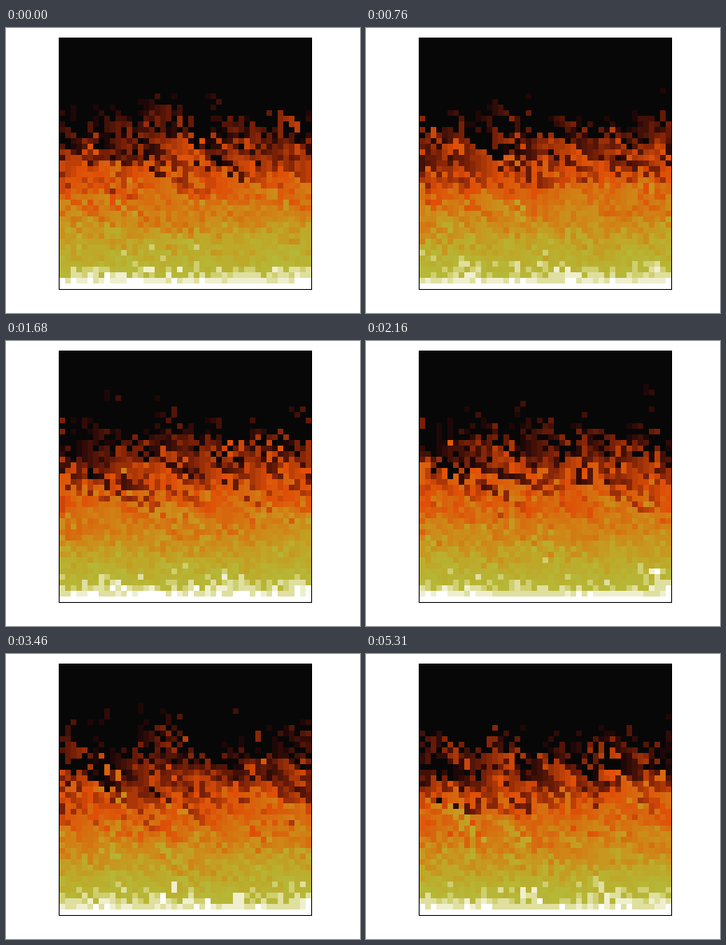
Write a matplotlib script that moves like this. It is 443 px wide and 357 px high and loops after 5720 ms.

```python
import numpy as np
import matplotlib.pyplot as plt
from matplotlib.animation import FuncAnimation
from matplotlib.colors import LinearSegmentedColormap

W, H, DPI = 443, 357, 128
CELL, GRID = 7, 45
SIZE = CELL * GRID
LEFT, TOP = 67, 12
LOOP, TICK = 5720, 10      # ms
STEP = 77                  # ms per fire update
WARMUP = 160
HOTTEST = 36

# Key colours by heat, blended in between
STOPS = {0: "#070707", 1: "#1f0707", 6: "#771f07", 12: "#df4f07",
         21: "#cf8717", 27: "#bfa727", 32: "#b7b737", 33: "#cfcf6f",
         HOTTEST: "#ffffff"}
RAMP = LinearSegmentedColormap.from_list(
    "fire", [(heat / HOTTEST, color) for heat, color in STOPS.items()], N=HOTTEST + 1)
COLORS = RAMP(np.arange(HOTTEST + 1), bytes=True)[:, :3]

# The fire redraws in short bursts, then stalls on single redraws
BURSTS = [(70, 210), (380, 530), (680, 990), (1140, 1460), (1600, 1920),
          (2080, 2480), (2850, 2920)]
SINGLES = [0, 2640, 3150, 3310, 3460, 5100, 5310]


def burst_times(first, last):
    count = min(5, 1 + round((last - first) / STEP))
    return np.linspace(first, last, count)


TIMES = np.sort(np.concatenate([SINGLES] + [burst_times(*b) for b in BURSTS]))


def spread(fire, rng):
    """Move heat one row up, cooling it and drifting it left at random."""
    decay = rng.integers(0, 3, (GRID - 1) * GRID)
    heat = np.maximum(fire[GRID:] - decay, 0)
    target = np.arange(decay.size) - decay
    for d in range(3):
        hit = (decay == d) & (target >= 0)
        fire[target[hit]] = heat[hit]


def simulate():
    rng = np.random.default_rng(12)
    fire = np.zeros(GRID * GRID, dtype=int)
    fire[-GRID:] = HOTTEST
    for _ in range(WARMUP):
        spread(fire, rng)
    states, done = [], 0
    for t in TIMES:
        while done < round(t / STEP):
            spread(fire, rng)
            done += 1
        states.append(fire.reshape(GRID, GRID).copy())
    return states


def render(state):
    img = np.full((H, W, 3), 255, dtype=np.uint8)
    img[TOP:TOP + SIZE + 1, LEFT - 1:LEFT + SIZE + 1] = 0
    cells = COLORS[state].repeat(CELL, axis=0).repeat(CELL, axis=1)
    # The frame's top edge lies over the first line of cells
    img[TOP + 1:TOP + SIZE, LEFT:LEFT + SIZE] = cells[1:]
    return img


images = [render(s) for s in simulate()]

fig = plt.figure(figsize=(W / DPI, H / DPI), dpi=DPI, facecolor="white")
picture = fig.figimage(images[0], origin="upper")


def draw(frame):
    shown = np.searchsorted(TIMES, frame * TICK + TICK / 2, side="right") - 1
    picture.set_data(images[shown])
    return [picture]


anim = FuncAnimation(fig, draw, frames=LOOP // TICK, interval=TICK,
                     init_func=lambda: draw(0), repeat=True, repeat_delay=0,
                     cache_frame_data=False)
plt.show()
```
